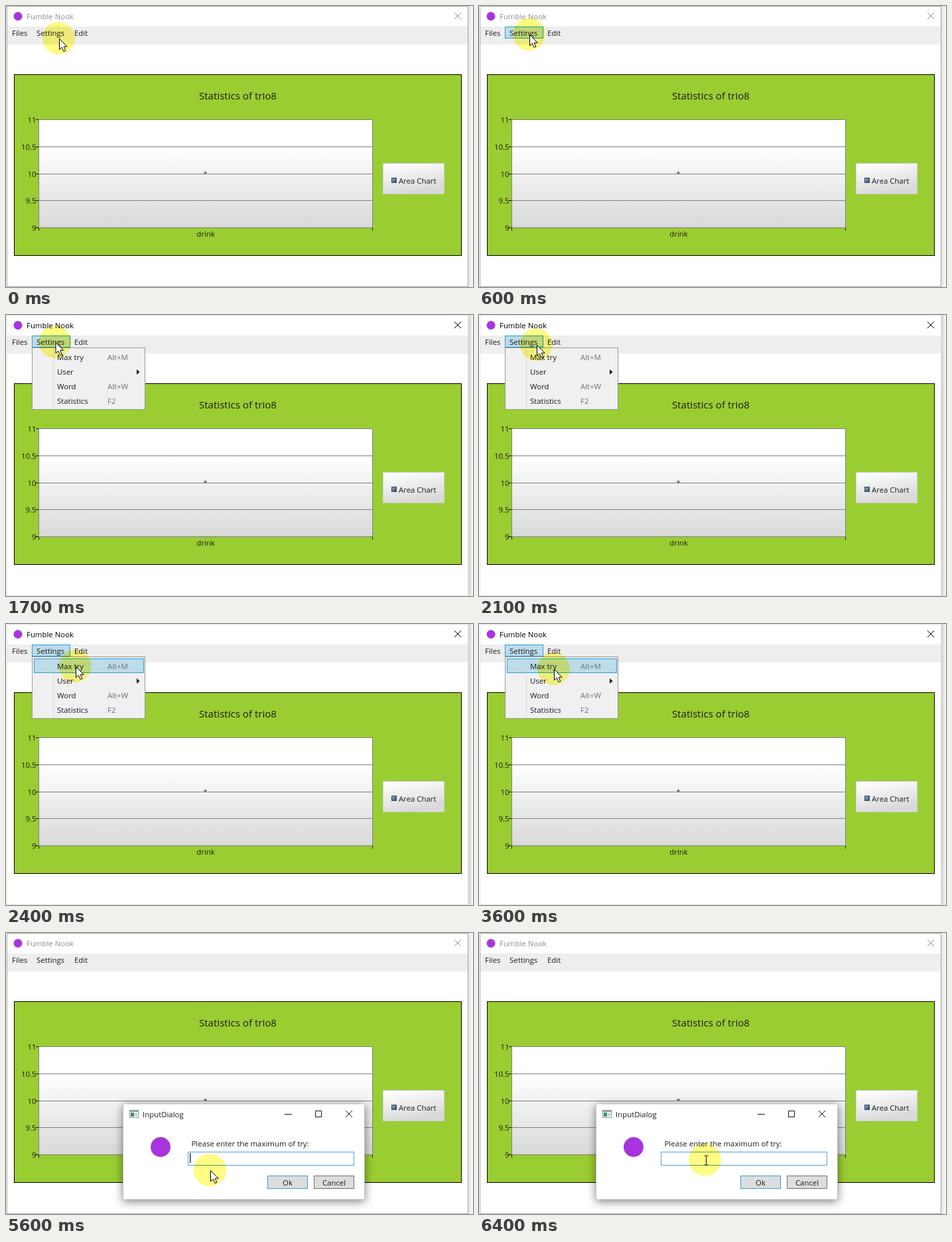
An HTML page for the animation above (8 s loop, 704 by 424 pixels).

```html
<!DOCTYPE html>
<html lang="en">
<head>
<meta charset="utf-8">
<title>Settings demo</title>
<style>
  html, body { margin: 0; width: 100%; height: 100%; overflow: hidden; background: #fff; }
  svg { display: block; width: 704px; height: 424px; font: 11.4px "Open Sans", "Noto Sans", sans-serif; fill: #1b1b1b; isolation: isolate; }
  .hot { fill: #bddbe9; stroke: #26a0da; }
  .key { fill: #707070; }
  .line { fill: none; stroke: #111; }
  .mid { text-anchor: middle; }
  .end { text-anchor: end; }
  #spot { fill: #fffb83; mix-blend-mode: multiply; }
  #dialog > .pane { fill: #fff; stroke: #b4b4b4; stroke-width: .6; filter: drop-shadow(0 3px 7px rgba(0, 0, 0, .5)); }
</style>
</head>
<body>
<svg viewBox="0 0 704 424">
  <defs>
    <linearGradient id="plotFill" x2="0" y2="1">
      <stop offset=".25" stop-color="#fff"/><stop offset="1" stop-color="#d9d9d9"/>
    </linearGradient>
    <linearGradient id="keyFill" x2=".35" y2="1">
      <stop offset=".05" stop-color="#fff"/><stop offset="1" stop-color="#d9d9d9"/>
    </linearGradient>
    <linearGradient id="swatch" x2="1" y2="1">
      <stop stop-color="#8fb4d6"/><stop offset="1" stop-color="#2c4a6b"/>
    </linearGradient>
    <linearGradient id="edge">
      <stop stop-color="#cfcfcf"/><stop offset="1" stop-color="#fafafa"/>
    </linearGradient>
  </defs>

  <!-- window -->
  <rect width="704" height="424" fill="#fff"/>
  <rect id="shade" x="697" width="7" height="424" fill="url(#edge)"/>
  <rect x="2" y="31" width="694" height="27" fill="#eee"/>
  <path id="frame" class="line" d="M1.5 424V.5H696.5V424M1 423.5H697"/>
  <circle cx="18" cy="15.5" r="6.5" fill="#a834e0"/>
  <text id="title" x="31" y="20">Fumble Nook</text>
  <path id="close" class="line" d="M676 10l10 10m0-10l-10 10"/>
  <rect id="tab" class="hot" x="39.5" y="31.5" width="57" height="17"/>
  <text x="9" y="45">Files</text>
  <text x="46" y="45">Settings</text>
  <text x="103" y="45">Edit</text>

  <!-- chart -->
  <rect x="12.5" y="103.5" width="674" height="273" fill="#9acd32" stroke="#000"/>
  <text class="mid" x="349.5" y="141" font-size="15.1">Statistics of trio8</text>
  <rect x="49.5" y="171.5" width="503" height="163" fill="url(#plotFill)" stroke="#808080"/>
  <path class="line" d="M49.5 335v4M552.5 335v4"/>
  <g id="axis"></g>
  <circle cx="300.5" cy="251.8" r="2.1" fill="#777"/>
  <text class="mid" x="301" y="348">drink</text>
  <rect x="568.5" y="237.5" width="92" height="46" fill="url(#keyFill)" stroke="#d0d0d0"/>
  <rect x="581.5" y="259.5" width="7" height="7" fill="url(#swatch)" stroke="#3a4654"/>
  <text x="592" y="268">Area Chart</text>

  <!-- drop-down -->
  <g id="menu">
    <rect x="39.5" y="49.5" width="170" height="93" fill="#f0f0f0" stroke="#999"/>
    <rect id="item" class="hot" x="42.5" y="52.5" width="165" height="21"/>
    <path d="M71.5 52V140" stroke="#d0d0d0" stroke-opacity=".8"/>
    <g id="items"></g>
    <path d="M197 82l4.5 4-4.5 4z"/>
  </g>

  <!-- input dialog -->
  <g id="dialog">
    <rect class="pane" x="176.5" y="258" width="364" height="144"/>
    <rect x="186.5" y="267.5" width="13" height="11" fill="#f6f6f6" stroke="#8d979c"/>
    <path d="M187 268h12v2h-12z" fill="#8aa5b5"/>
    <path d="M188 271h5v6h-5z" fill="#3c8a80"/>
    <path d="M194 272h4v4h-4z" fill="#c5ccd2"/>
    <text x="206" y="278">InputDialog</text>
    <path class="line" d="M420 273.5h11M466.5 268.5h9v9h-9zM512 268l10 10m0-10l-10 10"/>
    <circle cx="233" cy="323" r="15" fill="#a834e0"/>
    <text x="279.5" y="322">Please enter the maximum of try:</text>
    <rect x="274.5" y="330.5" width="250" height="20" fill="#fff" stroke="#569de5"/>
    <path id="caret" d="M277.7 332V347" stroke="#000" stroke-width="1.2"/>
    <rect x="394.5" y="366.5" width="60" height="19" fill="#ddd" stroke="#3c9ad8"/>
    <text class="mid" x="424.5" y="381">Ok</text>
    <rect x="464.5" y="366.5" width="60" height="19" fill="#ddd" stroke="#707070"/>
    <text class="mid" x="494.5" y="381">Cancel</text>
  </g>

  <!-- pointer -->
  <circle id="spot" r="24.5"/>
  <path id="arrow" d="M0 0V16.3L3.8 12.8L6.6 19L9.3 17.9L6.6 11.8H11.6Z" fill="#fff" stroke="#000"/>
  <path id="beam" class="line" d="M-3-6.5h2.5l.5.5.5-.5H3M-3 7.5h2.5l.5-.5.5.5H3M0-6V7"/>
</svg>
<script>
const LOOP = 8000;
const $ = id => document.getElementById(id);
const el = Object.fromEntries([...document.querySelectorAll('[id]')].map(e => [e.id, e]));

$('axis').innerHTML = [11, 10.5, 10, 9.5, 9].map((v, i) => {
  const y = 171.5 + Math.round(i * 40.8);
  const grid = i % 4 ? `<path d="M50 ${y}H552" stroke="#808080"/>` : '';
  return `${grid}<path d="M45 ${y}h4" stroke="#000"/><text class="end" x="45.5" y="${y + 4}">${v}</text>`;
}).join('');

$('items').innerHTML = [['Max try', 'Alt+M'], ['User', ''], ['Word', 'Alt+W'], ['Statistics', 'F2']]
  .map(([name, key], i) => {
    const y = 68 + 22 * i;
    return `<text x="77" y="${y}">${name}</text><text class="key" x="153" y="${y}">${key}</text>`;
  }).join('');

const moves = [
  [0, 80, 49], [300, 80, 48], [400, 79, 46], [500, 78, 44], [600, 76, 43], [700, 75, 42], [800, 74.5, 41],
  [1800, 93, 63], [1900, 84, 41], [2100, 87, 45], [2200, 93, 54], [2300, 100, 61],
  [2400, 105, 64], [2500, 108, 66], [2600, 112, 68], [2700, 115, 68], [3600, 113, 68],
  [4900, 79, 67], [5000, 102, 69], [5100, 127, 71],
  [5600, 308, 358], [6300, 328, 347], [6400, 342.5, 342.5]
];
const fade = [[0, 0], [1000, .15], [1200, .45], [1300, .75], [1400, 1], [4700, 0]];

const at = (table, t) => table.findLast(row => row[0] <= t);
const within = (t, from, to) => t >= from && t < to;
const show = (node, on) => node.setAttribute('visibility', on ? 'inherit' : 'hidden');

function draw(t) {
  const [, x, y] = at(moves, t);
  const alpha = at(fade, t)[1];
  const active = within(t, 800, 4700);
  const typing = t >= 6300;

  el.title.style.fill = active ? '#000' : '#8f8f8f';
  el.close.style.stroke = active ? '#000' : '#8f8f8f';
  el.frame.style.stroke = active ? '#e2e2e2' : '#a8a8a8';
  el.shade.setAttribute('opacity', active ? 1 : .6);

  show(el.tab, within(t, 500, 4700));
  el.menu.setAttribute('opacity', alpha);
  show(el.menu, alpha > 0);
  show(el.item, within(t, 2200, 4700));
  show(el.dialog, t >= 4700);
  show(el.caret, within(t, 4700, 5100) || within(t, 5600, 6300));

  el.spot.setAttribute('cx', x - (typing ? 2 : .7));
  el.spot.setAttribute('cy', y - .5);
  for (const node of [el.arrow, el.beam]) {
    const dx = node === el.arrow ? .5 : 0;
    node.setAttribute('transform', `translate(${x + dx} ${y + dx})`);
  }
  show(el.arrow, !typing);
  show(el.beam, typing);
}

const start = performance.now();
function tick() {
  draw((performance.now() - start) % LOOP);
  requestAnimationFrame(tick);
}
tick();
</script>
</body>
</html>
```
